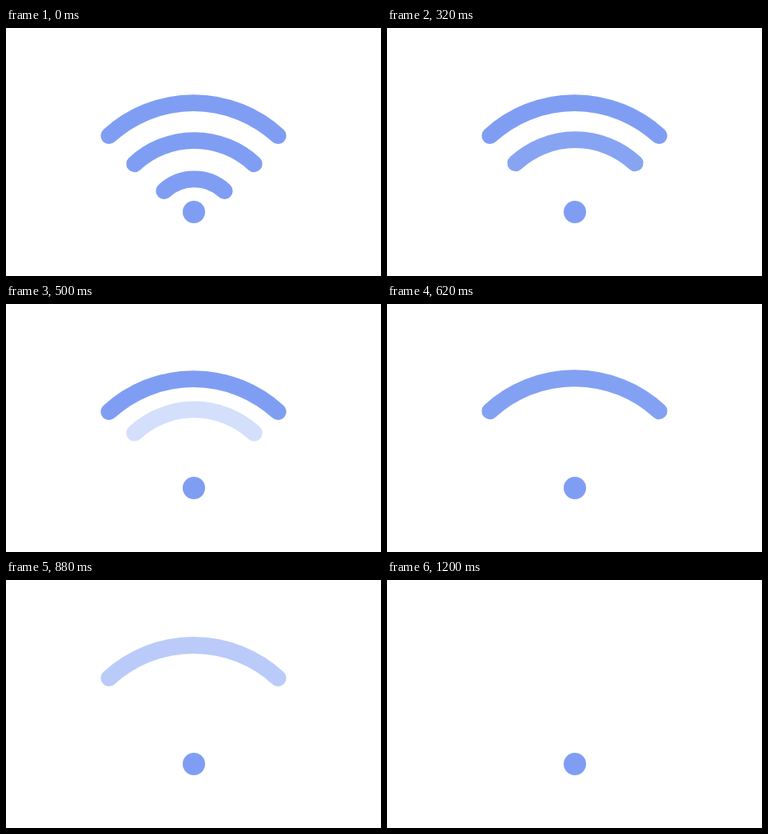
Animation of 469x310 px, one loop 1220 ms. Source, as an HTML page:

```html
<!DOCTYPE html>
<html lang="en">
<head>
<meta charset="utf-8">
<title>Wireless signal</title>
<style>
  html, body { margin: 0; width: 100%; height: 100%; overflow: hidden; background: #fff; }
  svg { display: block; width: 469px; height: 310px; }
  path { fill: none; stroke: #7f9ef3; stroke-width: 20.8; stroke-linecap: round; }
  circle { fill: #7f9ef3; }
</style>
</head>
<body>
<svg viewBox="0 0 469 310">
  <path d="M197.8 203.6A55.7 55.7 0 0 1 273.2 203.6"/>
  <path d="M160.8 169.8A110.1 110.1 0 0 1 310.2 169.8"/>
  <path d="M128.8 134.7A156.5 156.5 0 0 1 340.2 134.7"/>
  <circle cx="235" cy="230" r="14"/>
</svg>
<script>
  const LOOP = 1220, TICK = 20, RISE = 13, RISE_TIME = 300;
  const FADE_TIMES = [300, 300, 600];
  const arcs = document.querySelectorAll('path');
  const clamp = x => Math.min(1, Math.max(0, x));
  const snap = (t, step) => Math.floor(t / step) * step;

  function render(time) {
    const t = snap(time % LOOP, TICK);
    // The last part of the fade advances in coarse steps.
    const fadeTime = t < 880 ? t : snap(t, 80);
    arcs.forEach((arc, i) => {
      const start = i * RISE_TIME;
      const rise = RISE * clamp((t - start) / RISE_TIME);
      arc.setAttribute('transform', `translate(0 ${-rise})`);
      arc.setAttribute('opacity', 1 - clamp((fadeTime - start) / FADE_TIMES[i]));
    });
  }

  function frame() {
    render(performance.now());
    requestAnimationFrame(frame);
  }
  frame();
</script>
</body>
</html>
```
